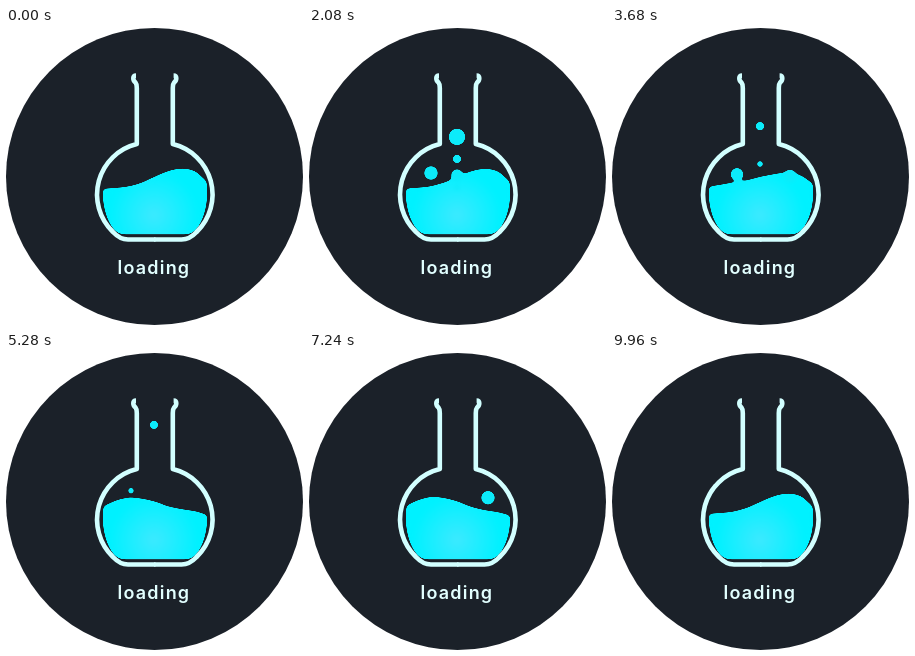
An HTML page for the animation above (10000 ms loop, 297 px wide and 297 px high).

```html
<!DOCTYPE html>
<html lang="en">
<head>
<meta charset="utf-8">
<title>Loading flask</title>
<style>
  html, body { margin: 0; width: 100%; height: 100%; overflow: hidden; background: #fff; }
  svg { display: block; width: 100vw; height: 100vh; }
  text { font: 600 18px Inter, "Open Sans", sans-serif; letter-spacing: 1.2px; fill: #e2ffff; }
</style>
</head>
<body>
<svg viewBox="0 0 297 297">
  <defs>
    <filter id="goo" filterUnits="userSpaceOnUse" x="80" y="30" width="140" height="190" color-interpolation-filters="sRGB">
      <feGaussianBlur stdDeviation="2"/>
      <feComponentTransfer><feFuncA type="linear" slope="12" intercept="-4.8"/></feComponentTransfer>
    </filter>
    <radialGradient id="glow" gradientUnits="userSpaceOnUse" cx="148" cy="187" r="44">
      <stop offset="0" stop-color="#3ce9ff"/>
      <stop offset="1" stop-color="#00f1ff"/>
    </radialGradient>
    <clipPath id="body">
      <path d="M97 163C97 180 102 195 109 202Q113 206 118 206H180Q185 206 189 202C196 195 201 180 201 163A52 52 0 0 0 97 163Z"/>
    </clipPath>
  </defs>
  <circle cx="148.5" cy="148.5" r="148.5" fill="#1b2129"/>
  <g filter="url(#goo)">
    <g clip-path="url(#body)"><path id="liquid" fill="url(#glow)"/></g>
    <g id="bubbles" fill="#0cebfa"></g>
  </g>
  <g fill="none" stroke="#d2ffff" stroke-width="4.6" stroke-linejoin="round">
    <path id="half" d="M130 47.5C126.5 47.5 126.5 52 129.5 54.5Q130.8 56 130.8 60V116A52 52 0 0 0 107 204Q114 211.5 122 211.5H149.5"/>
    <use href="#half" transform="translate(297.6) scale(-1 1)"/>
  </g>
  <text x="111.5" y="246">loading</text>
</svg>
<script>
  const LOOP = 10000, SLOSH = 2000, DEPTH = 160;
  const rightCrest = [161, 160.3, 158.7, 155, 149, 143.5, 141, 143.5, 154];
  const leftCrest = [152, 145.5, 142, 144, 149, 156, 160, 162, 164];

  // Rising bubbles: x, start, end, top, radius, ease power, fading share.
  const rising = [
    [148, 700, 2700, 86, 8.5, 1, 0.33],
    [148, 672, 4800, 75, 4, 1, 0.25],
    [122, 1500, 2700, 129, 6.5, 1, 0.4],
    [148, 1931, 5674, 50, 4, 2, 0.05],
    [125, 3250, 4450, 122, 6, 1, 0.4],
    [125, 4700, 5480, 130, 4, 1, 0.4],
    [148, 5400, 6900, 115, 6, 1, 0.4],
    [179, 6700, 7800, 129, 6.5, 1, 0.4],
    [125, 8200, 9550, 127, 4.5, 0.5, 0.4]
  ];
  // Swells that sink back: x, peak time, peak height, radius.
  const swells = [[148, 2080, 147, 5.5], [178, 3680, 148, 6], [125, 8600, 148, 3.5], [147, 8600, 148, 6]];

  const liquid = document.getElementById("liquid");
  const group = document.getElementById("bubbles");
  const mix = (a, b, k) => a + (b - a) * k;

  function addCircle(x) {
    const el = document.createElementNS("http://www.w3.org/2000/svg", "circle");
    el.setAttribute("cx", x);
    group.append(el);
    return el;
  }
  const drops = rising.map(([x]) => addCircle(x));
  const bumps = swells.map(([x]) => addCircle(x));

  // Smooth curve through evenly spaced surface heights.
  function surface(t) {
    const k = (1 - Math.cos(2 * Math.PI * t / SLOSH)) / 2;
    const step = 13.25;
    const ys = rightCrest.map((y, i) => mix(y, leftCrest[i], k));
    const slope = i => (ys[Math.min(i + 1, ys.length - 1)] - ys[Math.max(i - 1, 0)]) / 6;
    let d = `M96 ${ys[0]}`;
    for (let i = 1; i < ys.length; i++) {
      const x = 96 + i * step;
      d += `C${x - step * 2 / 3} ${ys[i - 1] + slope(i - 1)} ${x - step / 3} ${ys[i] - slope(i)} ${x} ${ys[i]}`;
    }
    return d + "V210H96Z";
  }

  // Small drops lose size in the blur, so they are drawn a little larger.
  function place(el, y, r) {
    el.setAttribute("cy", y);
    el.setAttribute("r", r < 1 ? r : r + 1.5 / r);
  }

  function draw(t) {
    liquid.setAttribute("d", surface(t));
    rising.forEach(([, from, to, top, size, power, fade], i) => {
      const k = (t - from) / (to - from);
      if (k < 0 || k > 1) return place(drops[i], DEPTH, 0);
      const grow = power > 1 ? Math.min(1, 0.3 + 0.75 * k) : 1;
      place(drops[i], mix(DEPTH, top, k ** power), size * grow * Math.min(1, (1 - k) / fade));
    });
    swells.forEach(([, peak, y, size], i) => {
      const u = Math.abs(t - peak) / 380;
      place(bumps[i], y + 13 * u * u, u < 1 ? size : 0);
    });
  }

  const start = performance.now();
  function tick() {
    draw(Math.max(0, performance.now() - start) % LOOP);
    requestAnimationFrame(tick);
  }
  draw(0);
  requestAnimationFrame(tick);
</script>
</body>
</html>
```
